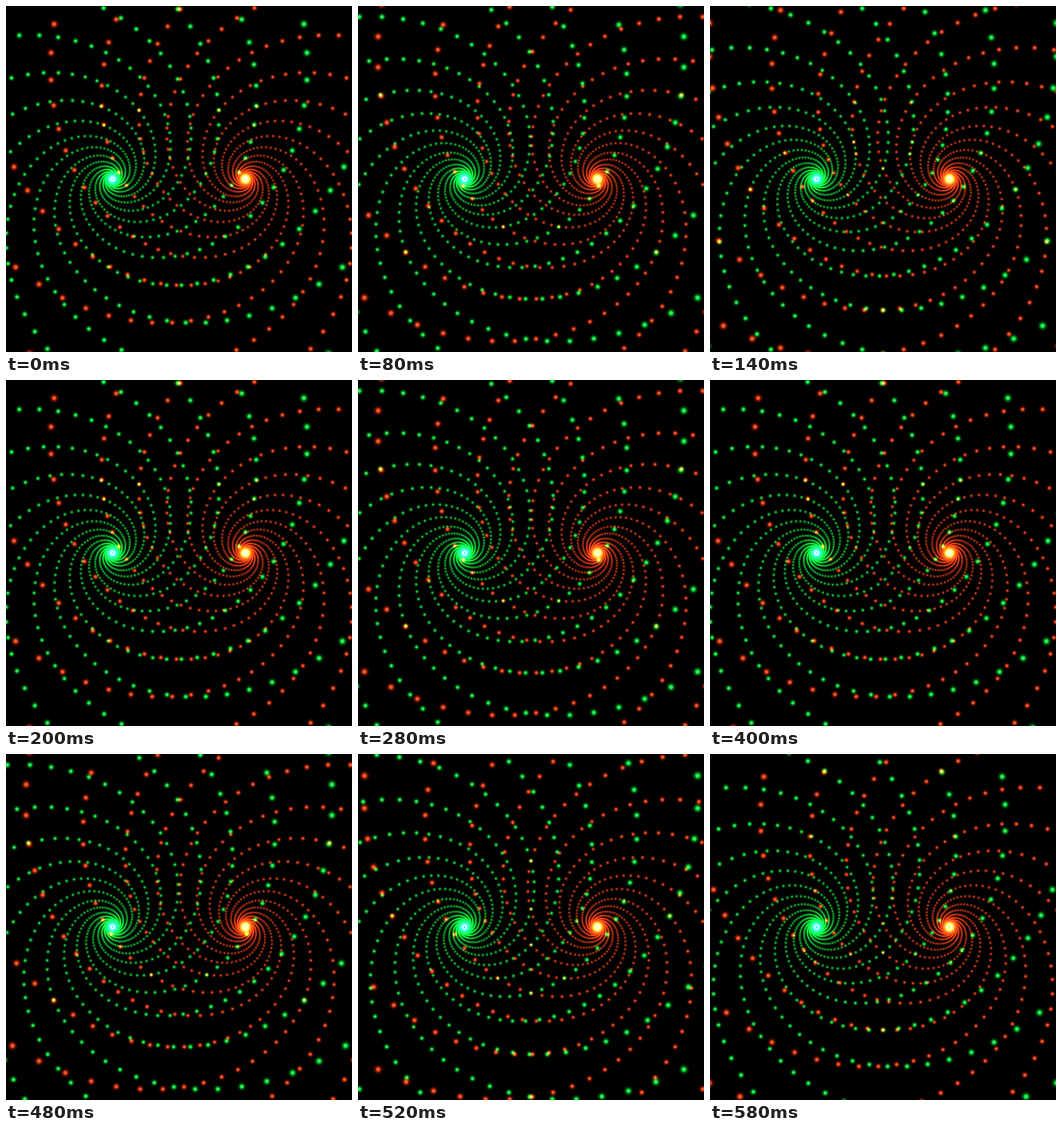
Animation of 500x500 px, one loop 0.6 s. Source, as an HTML page with a canvas:

```html
<!DOCTYPE html>
<html>
<head>
<meta charset="utf-8">
<style>
  html, body { margin: 0; width: 100%; height: 100%; overflow: hidden; background: #000; }
  canvas { display: block; }
</style>
</head>
<body>
<canvas id="stage" width="500" height="500"></canvas>
<script>
const ctx = document.getElementById('stage').getContext('2d');

const RAYS = 60;
const ARMS = 12;
const GROWTH = Math.PI / (6 * Math.sqrt(3)); // log distance between arms along a ray
const BASE = 247.5;
const STEP_MS = 20;
const STEPS = 10;

// A hot core that fades into a wide, darker halo
function dotFill(core, halo) {
  const fill = ctx.createRadialGradient(0, 0, 0, 0, 0, 1);
  fill.addColorStop(0, `rgba(${core},1)`);
  fill.addColorStop(0.25, `rgba(${core},0.95)`);
  fill.addColorStop(0.42, `rgba(${halo},0.6)`);
  fill.addColorStop(0.6, `rgba(${halo},0.25)`);
  fill.addColorStop(0.8, `rgba(${halo},0.07)`);
  fill.addColorStop(1, `rgba(${halo},0)`);
  return fill;
}

const spirals = [
  { x: 154, side: 1, fill: dotFill('36,255,90', '0,215,40') },
  { x: 346, side: -1, fill: dotFill('255,92,36', '220,40,6') }
];

function drawSpiral({ x, side, fill }, phase) {
  ctx.fillStyle = fill;
  for (let ray = 0; ray < RAYS; ray++) {
    const angle = (ray + 0.5) * 2 * Math.PI / RAYS;
    const shift = (ray * ARMS / RAYS) % 1;
    for (let ring = -17; ring < 3; ring++) {
      const r = BASE * Math.exp(GROWTH * (ring + shift + phase));
      const size = 2.8 + 0.016 * r;
      const px = x + side * r * Math.cos(angle);
      const py = 250 - r * Math.sin(angle);
      ctx.globalAlpha = Math.min(1, 0.6 + 0.002 * r);
      ctx.setTransform(size, 0, 0, size, px, py);
      ctx.fillRect(-1, -1, 2, 2);
    }
  }
}

function frame() {
  const phase = Math.floor(performance.now() / STEP_MS) % STEPS / STEPS;
  ctx.setTransform(1, 0, 0, 1, 0, 0);
  ctx.globalAlpha = 1;
  ctx.globalCompositeOperation = 'source-over';
  ctx.fillStyle = '#000';
  ctx.fillRect(0, 0, 500, 500);
  ctx.globalCompositeOperation = 'lighter';
  for (const spiral of spirals) drawSpiral(spiral, phase);
  requestAnimationFrame(frame);
}
frame();
</script>
</body>
</html>
```
